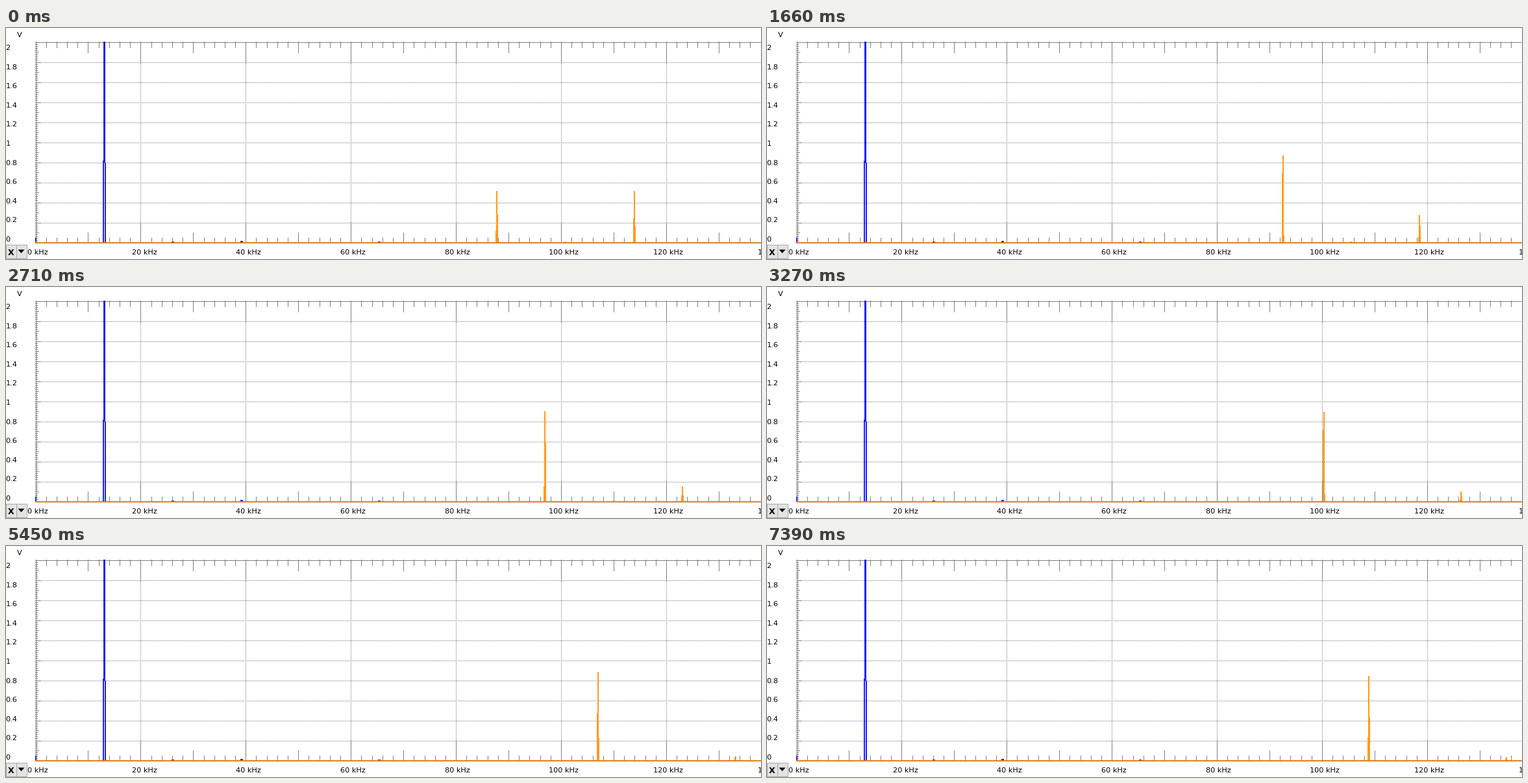
Write a matplotlib script that moves like this. It is 1163 px wide and 357 px high and loops after 7460 ms.

```python
import numpy as np
import matplotlib.pyplot as plt
from matplotlib.animation import FuncAnimation
from matplotlib.collections import LineCollection
from matplotlib.patches import Polygon, Rectangle

W, H, DPI = 1163, 357, 100
LOOP, TICK, STEP, HOLD = 7460, 20, 70, 260
PX = 72 / DPI

# Plot area in pixels: 20 kHz by 0.2 V divisions
LEFT, TOP, BASE = 45, 21, 331
DIV_X, DIV_Y = 161.9, 31
BIN = 1.35            # width of one spectrum bin
INPUT = 106           # spacing of the input signal's harmonics
GAP = 156.7           # distance between the sidebands, in bins

GREY, BLUE, ORANGE, FLOOR = "#808080", "#1e1eff", "#ff9a1e", "#e5801c"

# Lower sideband frequency in bins while the carrier is tuned by hand
TIMES = [260, 960, 1660, 2710, 3270, 4470, 5450, 6360]
BINS = [526.2, 529.0, 554.55, 581.3, 601.55, 618.7, 642.06, 653.15]

fig = plt.figure(figsize=(W / DPI, H / DPI), dpi=DPI, facecolor="white")
ax = fig.add_axes([0, 0, 1, 1])
ax.set_xlim(0, W)
ax.set_ylim(H, 0)
ax.axis("off")


def box(x, y, w, h, color, zorder=3):
    return ax.add_patch(Rectangle((x, y), w, h, fc=color, lw=0,
                                  antialiased=False, zorder=zorder))


def segments(lines, **style):
    ax.add_collection(LineCollection(lines, colors=GREY, linewidths=PX,
                                     antialiaseds=False, **style))


def label(x, y, text, size=11.3, **style):
    ax.text(x, y, text, fontsize=size * PX, family="DejaVu Sans",
            color="black", va="center_baseline", **style)


def tick_size(k, minor, half, full):
    return full if k % 10 == 0 else half if k % 5 == 0 else minor


def column(k, parts=1):
    return int(LEFT + DIV_X * k / parts) + 0.5


def draw_grid():
    dots = [[(LEFT, TOP + DIV_Y * k + 0.5), (W, TOP + DIV_Y * k + 0.5)]
            for k in range(1, 10)]
    dots += [[(column(k), TOP), (column(k), BASE)] for k in range(1, 7)]
    segments(dots, linestyles=[(0, (1, 2))])

    lines = [[(LEFT, TOP + 0.5), (W, TOP + 0.5)],
             [(LEFT + 0.5, TOP), (LEFT + 0.5, BASE)]]
    for k in range(1, 70):
        x, size = column(k, 10), tick_size(k, 9, 17, 33)
        lines += [[(x, TOP), (x, TOP + size)], [(x, BASE), (x, BASE - size + 2)]]
    for k in range(1, 100):
        y = int(TOP + DIV_Y * k / 10) + 0.5
        lines.append([(LEFT, y), (LEFT + tick_size(k, 3, 5, 8), y)])
    segments(lines)


def draw_labels():
    label(17, 10, "V")
    for k in range(11):
        label(-0.5, 30 + 29.6 * k, f"{round(2 - 0.2 * k, 1):g}")
    for k in range(8):
        label(33 + 160.7 * k, 346, f"{20 * k} kHz")


def draw_button():
    for x in (-0.5, 15.5):
        ax.add_patch(Rectangle((x, 334.5), 16, 21, fc="#e3e3e3", ec="#a9a9a9",
                               lw=PX, zorder=3))
    label(7.5, 346, "X", size=12.5, weight="bold", ha="center")
    ax.add_patch(Polygon([(18.5, 342.5), (28.5, 342.5), (23.5, 348)],
                         fc="black", lw=0, zorder=4))


def draw_input_signal():
    x, side = LEFT + INPUT, BASE - 126
    box(x - 1, TOP, 3, side - TOP + 3, BLUE)
    box(x - 2, side, 2, BASE - side, BLUE)
    box(x + 1, side + 3, 2, BASE - side - 3, BLUE)
    for n, height in ((2, 1), (3, 2), (5, 1)):
        box(LEFT + INPUT * n - 2, BASE - height, 4, height, BLUE)
    box(LEFT, 324, 2, 7, BLUE)


class Peak:
    """Spectral line: a centre bin and two neighbours as pixel columns."""

    def __init__(self):
        self.bars = [box(0, BASE, w, 0, ORANGE, zorder=5) for w in (1, 2, 1)]

    def set(self, position, height):
        centre = round(position)
        phase = position - centre
        x = round(LEFT + 0.5 + BIN * centre)
        height *= 1 - 0.12 * phase ** 2
        levels = flank(phase), 1, flank(-phase)
        for bar, offset, level in zip(self.bars, (-2, -1, 1), levels):
            top = round(BASE - height * level)
            bar.set_bounds(x + offset, top, bar.get_width(), BASE - top)


def flank(phase):
    return 0.38 - 0.8 * phase + 0.28 * phase ** 2


draw_grid()
draw_labels()
draw_button()
draw_input_signal()
box(LEFT, BASE, W, 2, FLOOR, zorder=4)

lower, upper = Peak(), Peak()
carrier = box(0, BASE - 1, 3, 1, ORANGE, zorder=5)


def update(i):
    time = i * TICK + TICK // 2
    time = HOLD + (time - HOLD) // STEP * STEP
    position = np.interp(time, TIMES, BINS)
    shift = position - BINS[0]

    # The filter passes the lower sideband and suppresses the upper one
    rise = 67 * (1 - np.exp(-0.766 * shift ** 0.3))
    rolloff = 13.5 * (shift / 127) ** 8
    lower.set(position, 79 + rise - rolloff)
    upper.set(position + GAP, 79 * np.exp(-shift / 45))

    carrier.set_x(round(LEFT + BIN * (position + GAP / 2)) - 1)
    carrier.set_visible(bool(shift < 60))
    return *lower.bars, *upper.bars, carrier


anim = FuncAnimation(fig, update, frames=LOOP // TICK, interval=TICK,
                     repeat=True, repeat_delay=0, blit=False)
plt.show()
```
